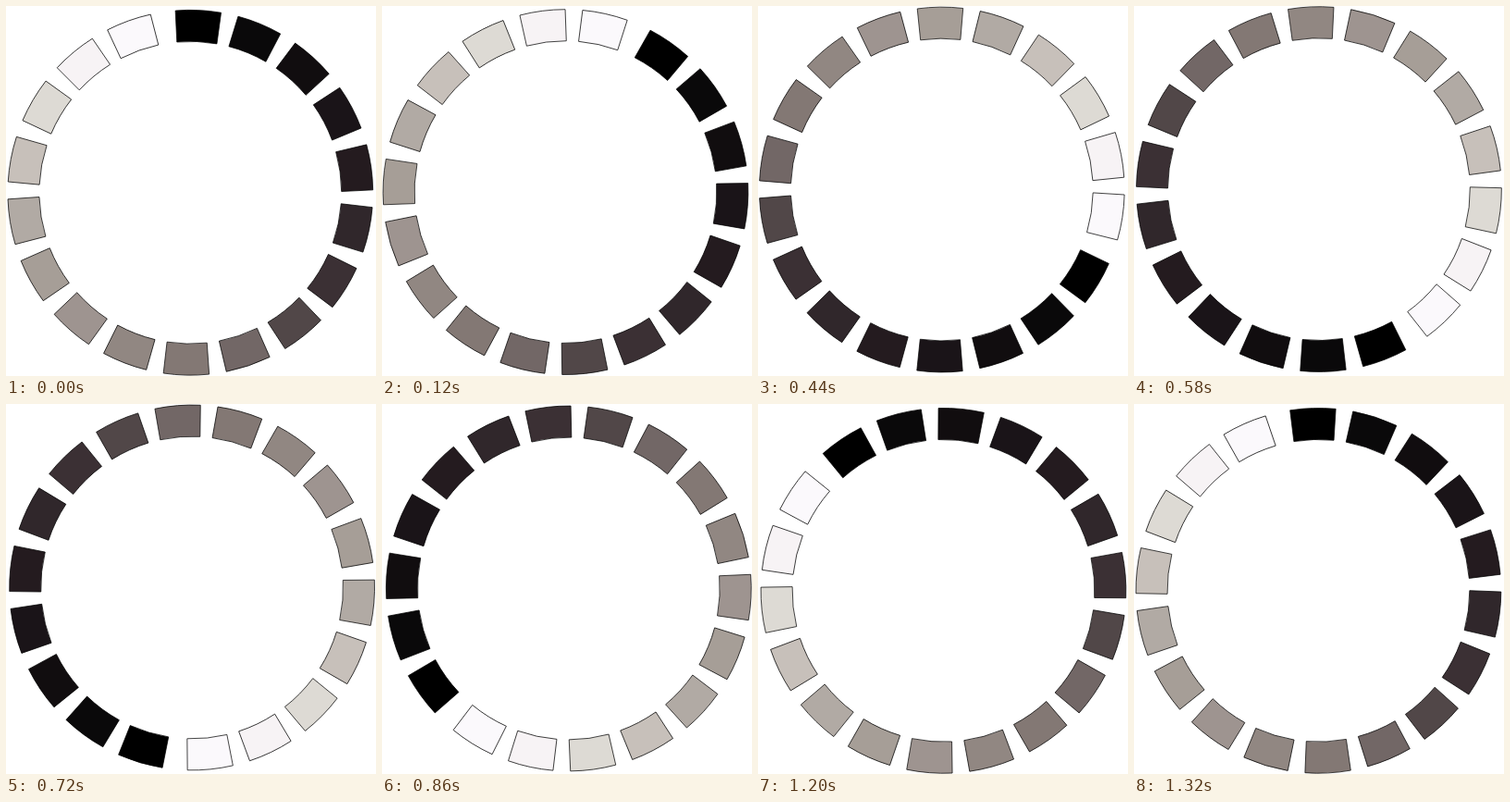
These frames come from a looping animation (400x400 px, 1.34 s). An HTML page with a canvas:

```html
<!DOCTYPE html>
<html lang="en">
<head>
<meta charset="utf-8">
<title>Rotating ring</title>
<style>
  html, body { margin: 0; width: 100%; height: 100%; overflow: hidden; background: #fff; }
  canvas { display: block; width: 400px; height: 400px; }
</style>
</head>
<body>
<canvas id="stage" width="400" height="400"></canvas>
<script>
const ctx = document.getElementById('stage').getContext('2d');

const LOOP = 1340, STEP = 20;
const TURN_PER_STEP = 5.39;
const FIRST_ANGLE = 2.5, SPACING = 19.865;
const OUTER = { radius: 197.4, half: 7.2 };
const INNER = { radius: 163.4, half: 7.6 };
const COLORS = [
  '#000000', '#0a090a', '#110d0f', '#1a1418', '#241b1f', '#30272b',
  '#3b3034', '#514748', '#726766', '#837874', '#918782', '#9e9490',
  '#a69e97', '#b1aaa4', '#c7c0ba', '#dddad4', '#f7f3f5', '#fbf9fc'
];

const rad = degrees => degrees * Math.PI / 180;

// One block of the ring, pointing straight up before rotation.
const block = new Path2D();
block.arc(0, 0, OUTER.radius, rad(-90 - OUTER.half), rad(-90 + OUTER.half));
block.arc(0, 0, INNER.radius, rad(-90 + INNER.half), rad(-90 - INNER.half), true);
block.closePath();

function draw(time) {
  const step = Math.floor((time % LOOP) / STEP);
  ctx.setTransform(1, 0, 0, 1, 0, 0);
  ctx.fillStyle = '#fff';
  ctx.fillRect(0, 0, 400, 400);

  // The ring sits slightly off its pivot, so it wobbles as it turns.
  ctx.translate(200, 200);
  ctx.rotate(rad(step * TURN_PER_STEP));
  ctx.translate(-0.7, 1.75);
  ctx.rotate(rad(FIRST_ANGLE));

  ctx.strokeStyle = '#000';
  ctx.lineWidth = 0.7;
  for (const color of COLORS) {
    ctx.fillStyle = color;
    ctx.fill(block);
    ctx.stroke(block);
    ctx.rotate(rad(SPACING));
  }
}

const start = performance.now();
function tick() {
  draw(performance.now() - start);
  requestAnimationFrame(tick);
}
tick();
</script>
</body>
</html>
```
